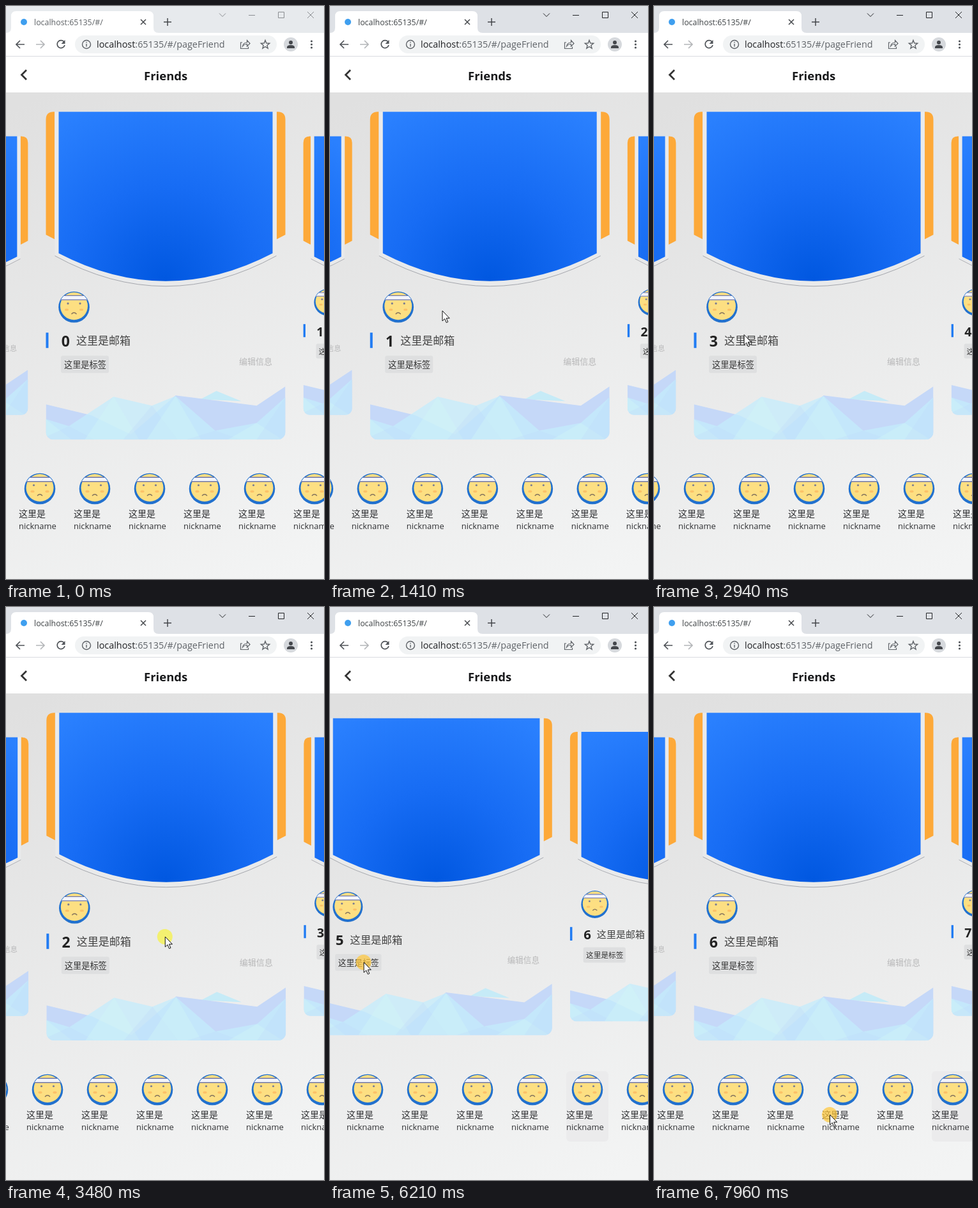
These frames come from a looping animation (498 by 895 pixels, 8000 ms). An HTML page with a canvas:

```html
<!DOCTYPE html>
<html lang="zh-CN">
<head>
<meta charset="utf-8">
<title>Friends</title>
<style>
html, body { margin: 0; width: 100%; height: 100%; overflow: hidden; background: #eee; }
canvas { display: block; width: 498px; height: 895px; }
</style>
</head>
<body>
<canvas id="stage"></canvas>
<script>
const W = 498, H = 895, LOOP = 8000;
const CARD_W = 375, CARD_H = 512, ITEM_W = 86, LIST_STEP = 80;
const DRAG_TIME = .55, DRAG_SHARE = .3;
const LATIN = '"Open Sans", "Noto Sans", sans-serif';
const HAN = '"Noto Sans CJK SC", "Noto Sans CJK", sans-serif';
const canvas = document.getElementById('stage');
const g = canvas.getContext('2d');
const dpr = window.devicePixelRatio || 1;
canvas.width = W * dpr;
canvas.height = H * dpr;

const clamp = k => Math.max(0, Math.min(1, k));
const mix = (a, b, k) => a + (b - a) * k;
const easeOut = k => 1 - (1 - k) ** 3;

// Each gesture presses at (x, y), drags part of the way, then lets go and settles.
const gestures = [
  { at: 780, end: 1440, x: 288, y: 476, page: 1 },
  { at: 1560, end: 2110, x: 256, y: 493, page: 2 },
  { at: 2300, end: 2860, x: 256, y: 505, page: 3 },
  { at: 2960, end: 3440, x: 140, y: 515, page: 2 },
  { at: 3480, end: 3740, x: 248, y: 515, page: 1 },
  { at: 4200, end: 4400, x: 226, y: 765, page: 3, tap: true },
  { at: 5060, end: 5400, x: 400, y: 768, page: 5, tap: true },
  { at: 5936, end: 6610, x: 136, y: 555, page: 6 },
  { at: 6850, end: 7500, x: 250, y: 800, list: 15 },
  { at: 7700, end: 8300, x: 275, y: 793 }
];

function stateAt(t) {
  const s = { page: 0, list: 0, x: 320, y: 560, free: 0, focus: -1, hold: -1, hand: false };
  for (const q of gestures) {
    if (t < q.at) {
      // Rest first, then travel to the next press in the last third of the pause.
      const k = clamp(3 * (t - s.free) / (q.at - s.free) - 2);
      s.x = mix(s.x, q.x, k);
      s.y = mix(s.y, q.y, k);
      break;
    }
    const release = mix(q.at, q.end, DRAG_TIME);
    const drag = DRAG_SHARE * clamp((t - q.at) / (release - q.at));
    const settle = clamp((t - release) / (q.end - release));
    const part = drag + (1 - DRAG_SHARE) * easeOut(settle);
    const page = q.page ?? s.page;
    const swipe = q.page && !q.tap;
    const list = swipe ? LIST_STEP * page : q.list ?? s.list;
    const reach = swipe ? (page - s.page) * CARD_W : list - s.list;
    s.x = q.x - drag * reach;
    s.y = q.y;
    s.page = mix(s.page, page, part);
    s.list = mix(s.list, list, swipe ? settle : part);
    s.free = release;
    s.hold = t < release ? t - q.at : -1;
    s.hand = Boolean(q.tap);
    if (q.tap) s.focus = page;
  }
  s.hand = s.hand && s.y > 725;
  return s;
}

function box(x, y, w, h, fill, r = 0) {
  g.fillStyle = fill;
  g.beginPath();
  g.roundRect(x, y, w, h, r);
  g.fill();
}

function disc(x, y, r, fill) {
  g.fillStyle = fill;
  g.beginPath();
  g.arc(x, y, r, 0, 7);
  g.fill();
}

function poly(fill, pts) {
  g.fillStyle = fill;
  g.beginPath();
  for (const [x, y] of pts) g.lineTo(x, y);
  g.fill();
}

function shape(d, fill) {
  g.fillStyle = fill;
  g.fill(new Path2D(d));
}

function trace(d, color, width = 1) {
  g.strokeStyle = color;
  g.lineWidth = width;
  g.stroke(new Path2D(d));
}

function text(s, x, y, size, color, family = LATIN, weight = 400) {
  g.font = `${weight} ${size}px ${family}`;
  g.fillStyle = color;
  g.fillText(s, x, y);
}

function drawTabs(active) {
  const ink = active ? '#222427' : '#8a8d91';
  box(0, 0, W, 42, active ? '#dee1e6' : '#e7eaed');
  shape('M0 42Q8 42 8 34V16Q8 8 16 8H223Q231 8 231 16V34Q231 42 239 42Z', '#fff');
  disc(28, 25, 5, '#3f9fef');
  text('localhost:65135/#/', 44, 30, 12.4, active ? '#3c4043' : '#5c6064');
  trace('M211 21l8 8m0-8l-8 8M247 25h12M253 19v12', '#45484c', 1.5);
  trace('M334 11.5l5 5 5-5M380 14.5h10M426.5 9.5h9v9h-9zM472 9l10 10m0-10l-10 10', ink);
}

function drawToolbar() {
  const gray = '#5f6368', dark = '#505459';
  box(0, 42, W, 36, '#fff');
  box(0, 78, W, 1, '#d9dbdf');
  trace('M29 60H16M22 54l-6 6 6 6', dark, 1.7);
  trace('M47 60h13M54 54l6 6-6 6', '#b4b6b9', 1.7);
  trace('M91 56a6 6 0 1 0 1 5', dark, 1.7);
  shape('M92.5 53v6h-6z', dark);
  box(108, 46, 316, 28, '#f1f3f4', 14);
  trace('M132.5 60a6.5 6.5 0 1 1-13 0a6.5 6.5 0 1 1 13 0M126 59v4.5M126 56v1.6', gray, 1.4);
  const host = 'localhost';
  text(host, 142, 65, 14.4, '#202124');
  text(':65135/#/pageFriend', 142 + g.measureText(host).width, 65, 14.4, gray);
  trace('M370 57h-2.5v9.5h12v-3M370.5 63q1-6 7-6v-3.5l4.5 5-4.5 4.5v-3.5q-4.5 0-7 3.5z', gray, 1.2);
  g.beginPath();
  for (let i = 0; i < 10; i++) {
    const a = (i / 5 - .5) * Math.PI, r = i % 2 ? 3 : 7;
    g.lineTo(406 + r * Math.cos(a), 60.5 + r * Math.sin(a));
  }
  g.closePath();
  g.lineWidth = 1.4;
  g.stroke();
  disc(446, 60, 11, '#d6d9dd');
  disc(446, 57, 3, '#44474c');
  shape('M440 66v-1.5q0-3.5 6-3.5t6 3.5v1.5z', '#44474c');
  for (let i = -1; i <= 1; i++) disc(478.5, 60 + 5 * i, 1.6, dark);
}

function drawHeader() {
  box(0, 79, W, 56, '#fff');
  trace('M32 100l-7.5 7.5 7.5 7.5', '#333', 2.8);
  text('Friends', 216, 116, 18.5, '#18191b', LATIN, 700);
}

function drawBody() {
  const bg = g.createLinearGradient(60, 135, 438, 895);
  bg.addColorStop(0, '#e0e0e0');
  bg.addColorStop(1, '#f3f4f4');
  box(0, 135, W, H - 135, bg);
}

function drawFace(x, y) {
  g.save();
  g.translate(x, y);
  disc(0, 0, 24.3, '#2271ce');
  disc(0, -1.5, 21.5, '#fddf82');
  for (const s of [-1, 1]) {
    disc(s * 9.5, -5.5, 1.6, '#7c7d92');
    box(s * 11.5 - 3, 2.5, 6, 3.4, '#fbc268', 1.7);
  }
  trace('M-4 11q4-4.5 8 0', '#85745d', 1.4);
  g.beginPath();
  g.arc(0, 0, 23.5, 0, 7);
  g.clip();
  box(-25, -18, 50, 7, '#f3f4fa');
  for (const line of [-18.5, -12]) box(-25, line, 50, 1.4, '#7079ad');
  g.restore();
}

function drawWaves() {
  const back = [[0, 457], [71, 474], [133, 504], [203, 443], [330, 459], [375, 429]];
  const front = [[0, 480], [36, 491], [106, 445], [166, 459], [203, 444], [265, 498], [330, 486], [375, 446]];
  const ground = [[375, 512], [0, 512]];
  g.save();
  g.beginPath();
  g.roundRect(0, 400, CARD_W, 112, 12);
  g.clip();
  poly('#c6ebf7', [[242, 449], [267, 436], [306, 452]]);
  poly('#c5d8f8', [...back, ...ground]);
  poly('rgba(197,236,252,.75)', [...front, ...ground]);
  front.forEach(([x, y], i) => {
    const tint = i % 2 ? 'rgba(190,214,248,.3)' : 'rgba(208,244,246,.4)';
    poly(tint, [[x, y], [x + 40, CARD_H], [x - 45, CARD_H]]);
  });
  g.restore();
}

function drawCard(n, page) {
  const d = n - page, scale = 1 - .15 * Math.min(1, Math.abs(d));
  g.save();
  g.translate(250 + d * CARD_W, 421.2);
  g.scale(scale, scale);
  g.translate(-CARD_W / 2, -CARD_H / 2);

  shape('M0 192V12Q0 0 12 0H13.5V199ZM375 192V12Q375 0 363 0H361.5V199Z', '#fda939');
  shape('M14 0V225Q187.5 320 361 225V0Z', '#e9eaeb');
  trace('M14 225Q187.5 320 361 225', '#a4a6ac');
  const blue = g.createRadialGradient(187, 266, 0, 187, 266, 300);
  blue.addColorStop(0, '#0057e0');
  blue.addColorStop(.5, '#176cf4');
  blue.addColorStop(1, '#2a80fe');
  shape('M20 0V221Q187.5 308 355 221V0Z', blue);

  drawFace(44, 305);
  box(0, 345, 4, 24, '#217cf3');
  text(n, 24.2, 367, 23, '#222', LATIN, 700);
  text('这里是邮箱', 47.5, 364, 17, '#444', HAN);
  box(23.5, 381, 75, 27, '#dedfe0', 3);
  text('这里是标签', 28.5, 400, 13.2, '#333', HAN);
  text('编辑信息', 302.5, 395, 13, '#b8b8b9', HAN);
  drawWaves();
  g.restore();
}

function drawList({ list, focus }) {
  const first = Math.max(0, Math.floor(list / ITEM_W) - 1);
  for (let i = first; i < first + 9; i++) {
    const x = 20 + i * ITEM_W - list;
    if (i === focus) box(x, 725, 66, 110, '#ebebec', 6);
    drawFace(x + 33, 754);
    text('这里是', x, 798, 14, '#303134', HAN);
    text('nickname', x, 817, 13, '#303134');
  }
}

function drawCursor({ x, y, hold, hand }) {
  if (hold >= 0) disc(x, y, 12, hold < 70 ? 'rgba(245,242,85,.82)' : 'rgba(255,200,60,.72)');
  g.save();
  g.translate(x, y);
  const outline = hand
    ? 'M-1.5 1q0-2 1.7-2t1.7 2v7q0-1.5 1.7-1.5t1.7 2q0-1.5 1.6-1.5t1.7 2q0-1 1.5-1t1.5 2v5q0 3-2 4v2.5h-7.5v-2.5q-3-3-5-7-1.5-2.5 0-3t3.2 2z'
    : 'M.5 0V16l3.7-3.5 2.5 6 2.5-1-2.5-5.8h5z';
  shape(outline, '#fff');
  trace(outline, '#111');
  g.restore();
}

function draw(t) {
  const s = stateAt(t);
  g.setTransform(dpr, 0, 0, dpr, 0, 0);
  drawBody();
  const mid = Math.floor(s.page);
  for (let n = mid - 1; n <= mid + 2; n++) drawCard(n, s.page);
  drawList(s);
  drawTabs(t >= 390);
  drawToolbar();
  drawHeader();
  if (t >= 420) drawCursor(s);
}

const start = performance.now();
function tick() {
  draw((performance.now() - start) % LOOP);
  requestAnimationFrame(tick);
}
tick();
</script>
</body>
</html>
```
